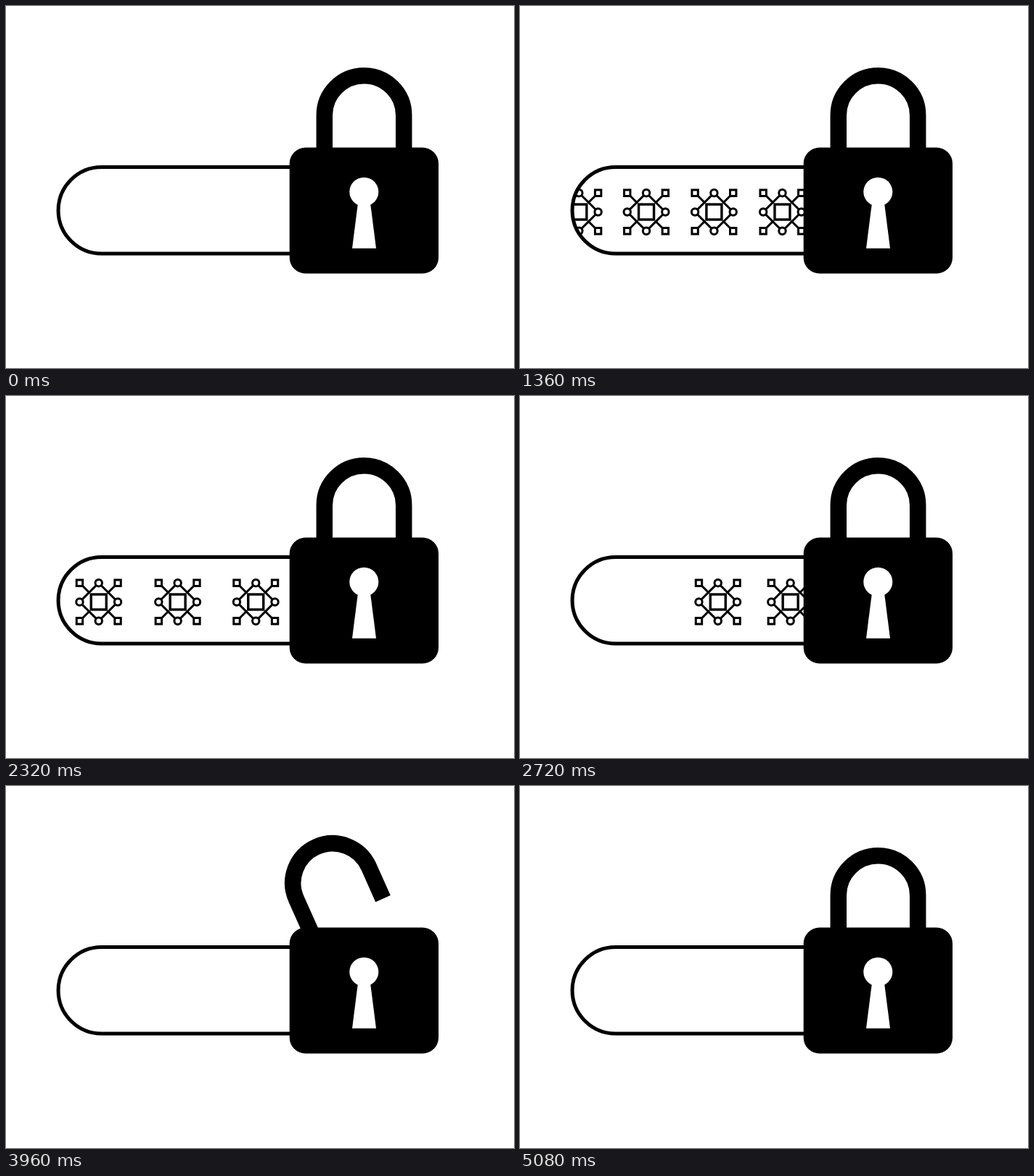
Animation, 700 px wide and 500 px high, one loop 5.12 s. Source, as an HTML page:

```html
<!DOCTYPE html>
<html lang="en">
<head>
<meta charset="utf-8">
<title>Data entering a padlock</title>
<style>
  html, body { margin: 0; width: 100%; height: 100%; overflow: hidden; background: #fff; }
  svg { display: block; width: 100vw; height: 100vh; }
</style>
</head>
<body>
<svg viewBox="0 0 700 500">
  <defs>
    <clipPath id="inside"><rect x="72" y="222.5" width="520" height="119.5" rx="59.75"/></clipPath>
    <g id="node" fill="#fff" stroke="#000" stroke-width="3">
      <path fill="none" d="M0-26.3L26.3 0L0 26.3L-26.3 0ZM-23-23L-12-12M23-23L12-12M-23 23L-12 12M23 23L12 12"/>
      <rect x="-10.5" y="-10.5" width="21" height="21" stroke-width="3.4"/>
      <path d="M-30.5-30.5h8.4v8.4h-8.4zM22.1-30.5h8.4v8.4h-8.4zM-30.5 22.1h8.4v8.4h-8.4zM22.1 22.1h8.4v8.4h-8.4z"/>
      <circle cx="-26.3" r="4.7"/><circle cx="26.3" r="4.7"/>
      <circle cy="-26.3" r="4.7"/><circle cy="26.3" r="4.7"/>
    </g>
  </defs>
  <g id="nodes" clip-path="url(#inside)"></g>
  <path d="M500 222.5H131.8a59.75 59.75 0 0 0 0 119.5H500" fill="none" stroke="#000" stroke-width="5"/>
  <path id="shackle" d="M438.8 230V151a54.7 54.7 0 0 1 109.4 0V199" fill="none" stroke="#000" stroke-width="22.5"/>
  <rect x="390.7" y="195.5" width="205.3" height="174" rx="22"/>
  <g fill="#fff">
    <circle cx="493.3" cy="256.7" r="20"/>
    <path d="M485.5 268H501.5L510 334.7H477Z"/>
  </g>
</svg>
<script>
  const LOOP = 5120, COUNT = 7, GAP = 90, STAGGER = 39;
  const REST = 345, ENTER = 307, LEAVE = 687;
  const clamp = v => Math.min(1, Math.max(0, v));
  const smooth = s => s * s * (3 - 2 * s);

  // cubic-bezier(1/3, 0, 0, 1): quick start, long slow arrival
  function glide(x) {
    if (x <= 0 || x >= 1) return clamp(x);
    let lo = 0, hi = 1;
    for (let i = 0; i < 24; i++) {
      const s = (lo + hi) / 2;
      if (s * (1 - s) ** 2 + s ** 3 < x) lo = s; else hi = s;
    }
    return smooth(lo);
  }

  const group = document.getElementById('nodes');
  const shackle = document.getElementById('shackle');
  const nodes = Array.from({ length: COUNT }, () => {
    const node = document.createElementNS('http://www.w3.org/2000/svg', 'use');
    node.setAttribute('href', '#node');
    return group.appendChild(node);
  });

  function draw(t) {
    nodes.forEach((node, k) => {
      const local = t - k * STAGGER;
      const x = REST - GAP * k
        - ENTER * (1 - glide(local / 575))
        + LEAVE * glide((local - 1020) / 4440);
      node.setAttribute('transform', `translate(${x} 284.5)`);
    });
    const open = smooth(clamp((t - 3060) / 580)) - smooth(clamp((t - 4500) / 580));
    shackle.setAttribute('transform', `rotate(${-24 * open} 431.7 244.8)`);
  }

  const start = performance.now();
  function tick() {
    draw((performance.now() - start) % LOOP);
    requestAnimationFrame(tick);
  }
  tick();
</script>
</body>
</html>
```
